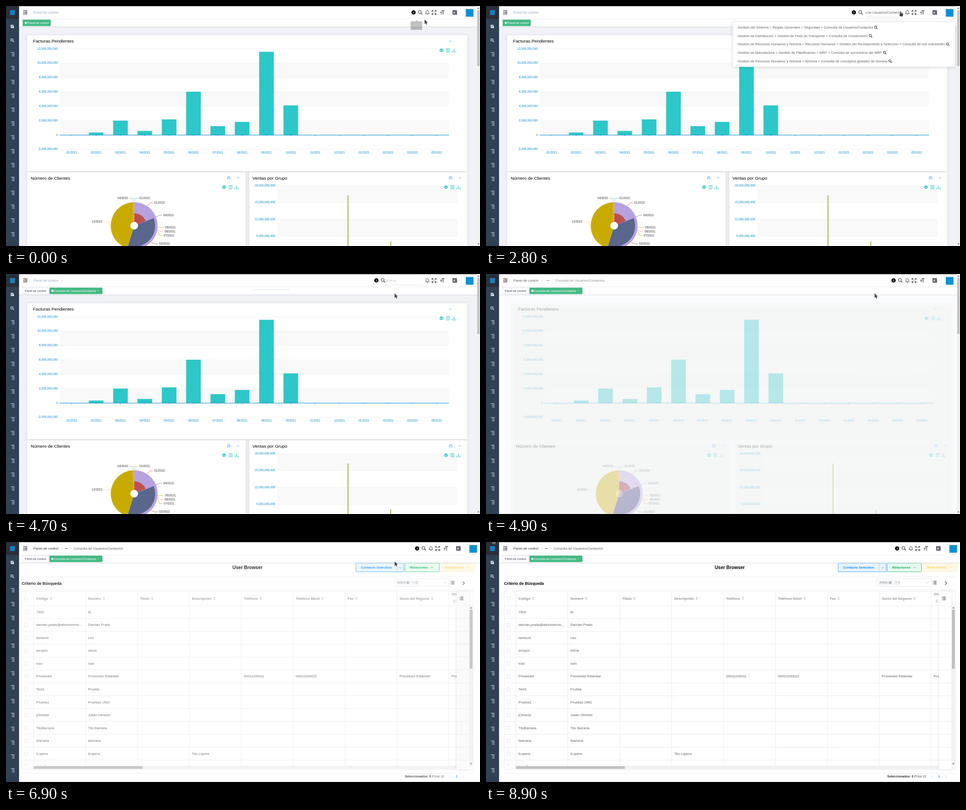
Animation, 1052 px wide and 532 px high, one loop 9000 ms. Source, as an HTML page with a canvas:

```html
<!DOCTYPE html>
<html lang="es">
<head>
<meta charset="utf-8">
<title>Panel de control</title>
<style>
html, body { margin: 0; width: 100%; height: 100%; overflow: hidden; background: #fff; }
canvas { display: block; width: 1052px; height: 532px; }
</style>
</head>
<body>
<canvas id="stage" width="1052" height="532"></canvas>
<script>
const c = document.getElementById('stage').getContext('2d');
const LOOP = 9000, PX = 0.548;
const BLUE = '#008acd', TEAL = '#2ec7c9', INK = '#303133', GREY = '#606266', PALE = '#c0c4cc';

// ---- helpers ----
const clamp = v => Math.max(0, Math.min(1, v));
const lerp = (a, b, p) => a + (b - a) * p;

function bezier(x1, y1, x2, y2) {
  const at = (a, b, u) => 3 * (1 - u) * (1 - u) * u * a + 3 * (1 - u) * u * u * b + u * u * u;
  return x => {
    if (x <= 0 || x >= 1) return clamp(x);
    let lo = 0, hi = 1;
    for (let i = 0; i < 24; i++) {
      const mid = (lo + hi) / 2;
      if (at(x1, x2, mid) < x) lo = mid; else hi = mid;
    }
    return at(y1, y2, lo);
  };
}
const ease = bezier(.25, .1, .25, 1);
const zoom = bezier(.23, 1, .32, 1);

function rect(x, y, w, h, fill) { c.fillStyle = fill; c.fillRect(x, y, w, h); }

function box(x, y, w, h, r, fill, stroke) {
  c.beginPath();
  c.roundRect(x, y, w, h, r);
  if (fill) { c.fillStyle = fill; c.fill(); }
  if (stroke) { c.strokeStyle = stroke; c.lineWidth = .8; c.stroke(); }
}

function line(color, width, ...p) {
  c.beginPath();
  for (let i = 0; i < p.length; i += 2) c.lineTo(p[i], p[i + 1]);
  c.strokeStyle = color;
  c.lineWidth = width;
  c.stroke();
}

function shape(fill, ...p) {
  c.beginPath();
  for (let i = 0; i < p.length; i += 2) c.lineTo(p[i], p[i + 1]);
  c.closePath();
  c.fillStyle = fill;
  c.fill();
}

function disc(x, y, r, fill) {
  c.beginPath();
  c.arc(x, y, r, 0, 7);
  c.fillStyle = fill;
  c.fill();
}

// size is in page pixels before the stage scale
function text(s, x, y, size, color, align = 'left', style = '') {
  c.font = `${style} ${size * PX}px "Liberation Sans", Arial, sans-serif`;
  c.textAlign = align;
  c.textBaseline = 'middle';
  c.fillStyle = color;
  c.fillText(s, x, y);
  return c.measureText(s).width;
}

function group(draw, { x = 0, alpha = 1, clip } = {}) {
  c.save();
  if (clip) { c.beginPath(); c.rect(...clip); c.clip(); }
  c.translate(x, 0);
  c.globalAlpha *= alpha;
  draw();
  c.restore();
}

// ---- icons ----
function chevron(x, y, r, angle, color, w = .9) {
  c.save();
  c.translate(x, y);
  c.rotate(angle);
  line(color, w, -r, r / 2, 0, -r / 2, r, r / 2);
  c.restore();
}
const UP = 0, RIGHT = Math.PI / 2, DOWN = Math.PI, LEFT = -Math.PI / 2;

function magnifier(x, y, r, color, w = 1.2) {
  c.beginPath();
  c.arc(x - r * .25, y - r * .25, r * .75, 0, 7);
  c.strokeStyle = color;
  c.lineWidth = w;
  c.stroke();
  line(color, w * 1.2, x + r * .3, y + r * .3, x + r * 1.1, y + r * 1.1);
}

function listIcon(x, y, color) {
  for (let i = -1; i < 2; i++) {
    rect(x - 4, y + i * 3 - .5, 1.2, 1.1, color);
    rect(x - 2, y + i * 3 - .5, 6, 1.1, color);
  }
}

function treeIcon(x, y) {
  const ink = '#dfe6ee';
  rect(x - 4, y - 4.4, 1.2, 1.1, ink);
  rect(x - 2, y - 4.4, 6, 1.1, ink);
  for (let i = 0; i < 3; i++) {
    rect(x - 1.5, y - 1.7 + i * 2.6, 1, 1, ink);
    rect(x + .3, y - 1.7 + i * 2.6, 3.9, 1, ink);
  }
}

function pageIcon(x, y, color) {
  rect(x - 3.5, y - 3.5, 6, 7, color);
  rect(x - 2, y - 1.6, 3, .8, '#304156');
  rect(x - 2, y + .2, 3, .8, '#304156');
  disc(x + 2.2, y + 1.7, 2, color);
}

function toolbox(x, y) {
  shape(TEAL, x - 4.5, y - 1.8, x, y - 4, x + 4.5, y - 1.8, x, y + .5);
  shape(TEAL, x - 4.5, y - .4, x, y + 1.8, x + 4.5, y - .4, x + 4.5, y + 1.8, x, y + 4, x - 4.5, y + 1.8);
  c.strokeStyle = TEAL;
  c.lineWidth = .9;
  c.strokeRect(x + 11.2, y - 3.8, 6.2, 7.8);
  for (let i = -1; i < 2; i++) line(TEAL, .7, x + 12.6, y + i * 1.9, x + 16, y + i * 1.9);
  line(TEAL, .9, x + 27.8, y - 4, x + 27.8, y + 2);
  line(TEAL, .9, x + 25.3, y - .4, x + 27.8, y + 2.2, x + 30.3, y - .4);
  line(TEAL, .9, x + 23.6, y + 1.5, x + 23.6, y + 4, x + 32, y + 4, x + 32, y + 1.5);
}

function printer(x, y) {
  c.strokeStyle = '#409eff';
  c.lineWidth = .8;
  c.strokeRect(x - 3, y - 1, 6, 3.6);
  line('#409eff', .8, x - 1.8, y - 1, x - 1.8, y - 2.8, x + 1.8, y - 2.8, x + 1.8, y - 1);
}

function sortIcon(x, y) {
  shape(PALE, x - 2.6, y - .8, x, y - 3.4, x + 2.6, y - .8);
  shape(PALE, x - 2.6, y + .8, x, y + 3.4, x + 2.6, y + .8);
}

function scrollbar(x, w, top, bottom, from, to) {
  rect(x, top, w, bottom - top, '#f1f1f1');
  rect(x + 1, from, w - 2, to - from, '#c1c1c1');
  const m = x + w / 2;
  shape('#505050', m - 2, top + 6, m, top + 3.6, m + 2, top + 6);
  shape('#505050', m - 2, bottom - 5.5, m, bottom - 3, m + 2, bottom - 5.5);
}

// ---- dashboard ----
function card(x, y, w, h) {
  c.save();
  c.shadowColor = 'rgba(0,0,0,.12)';
  c.shadowBlur = 6;
  c.shadowOffsetY = 1;
  rect(x, y, w, h, '#fff');
  c.restore();
}

function invoices() {
  card(47, 65, 977, 301.5);
  text('Facturas Pendientes', 60, 78.5, 18, '#000');
  chevron(986, 78, 2.8, UP, '#409eff');
  const step = 31.85;
  for (let i = 0; i < 8; i++) {
    const y = 95 + i * step, n = 12 - 2 * i;
    if (i % 2 && i < 7) rect(119, y, 864, step, '#f9f9f9');
    line('#eee', .7, 119, y, 983, y);
    text(n ? n + ',000,000,000' : '0', 115, y - .3, 12, BLUE, 'right');
  }
  const tops = [286, 280.5, 254, 277, 251.3, 190, 266.3, 257, 101.5, 220.3];
  for (let i = 0; i < 16; i++) {
    const x = 146 + 54 * i, m = i < 15 ? i % 12 + 1 : 5;
    if (i < tops.length) rect(x - 16.2, tops[i], 32.5, 286 - tops[i], TEAL);
    line(BLUE, .7, x, 286, x, 289);
    text(String(m).padStart(2, '0') + (i < 12 ? '/2021' : '/2022'), x, 325.3, 12, BLUE, 'center');
  }
  line(BLUE, 1, 119, 286.2, 983, 286.2);
  toolbox(966.5, 98);
}

function slice(r, from, to, fill) {
  const a = d => (d - 90) * Math.PI / 180;
  c.beginPath();
  c.moveTo(284.5, 487);
  c.arc(284.5, 487, r, a(from), a(to));
  c.fillStyle = fill;
  c.fill();
}

function clients() {
  card(47, 368.5, 485, 180);
  text('Número de Clientes', 55, 382.5, 18, '#000');
  printer(494.5, 381);
  chevron(514.5, 381, 2.8, UP, '#409eff');
  toolbox(484, 401.5);
  slice(52, 0, 197, '#b6a2de');
  slice(46.5, 69, 197, '#59678c');
  slice(27.5, 0, 67, '#c05050');
  slice(52, 197, 356, '#c9ab00');
  slice(52, 356, 360, '#f5994e');
  disc(284.5, 487, 8.5, '#fff');
  // label, text x, side, colour, leader start, bend
  const labels = [
    ['04/2022', 271, -1, '#97b552', 282, 435, 282, 426.5],
    ['01/2021', 296, 1, '#5ab1ef', 286, 435, 286, 426.5],
    ['01/2022', 329, 1, '#c05050', 314, 444, 319, 436.5],
    ['04/2021', 349, 1, '#59678c', 333, 467.5, 340, 464],
    ['05/2021', 353, 1, '#c9ab00', 337, 490.5, 343, 491.5],
    ['06/2021', 352, 1, '#f5994e', 336, 493, 342, 500],
    ['07/2021', 350, 1, '#7eb00a', 336, 496, 341, 509],
    ['02/2022', 340, 1, '#6f5553', 322, 524, 330, 527.5],
    ['12/2021', 214, -1, '#ffb980', 233, 479, 224, 478]
  ];
  for (const [s, x, side, color, x0, y0, x1, y1] of labels) {
    line(color, .7, x0, y0, x1, y1, x - side * 3, y1);
    text(s, x, y1, 12, '#333', side > 0 ? 'left' : 'right');
  }
}

function sales() {
  card(540, 368.5, 484, 180);
  text('Ventas por Grupo', 547, 382.5, 18, '#000');
  printer(987, 381);
  chevron(1007, 381, 2.8, UP, '#409eff');
  for (let i = 0; i < 4; i++) {
    const y = 398.3 + i * 37.3;
    if (i % 2 === 0) rect(602, y, 400, 37.3, '#f9f9f9');
    line('#eee', .7, 602, y, 1002, y);
    text(18 - 3 * i + ',000,000,000', 597.5, y, 12, BLUE, 'right');
  }
  rect(758, 420, 2, 112, '#97b552');
  rect(852.8, 522, 2, 10, '#97b552');
  toolbox(976.5, 401.5);
}

function dashboard() {
  rect(29, 46, 1023, 486, '#f0f2f5');
  invoices();
  clients();
  sales();
}

// ---- browser ----
const HEADS = ['Código', 'Nombre', 'Título', 'Descripción', 'Teléfono', 'Teléfono Móvil', 'Fax', 'Socio del Negocio'];
const ROWS = [
  ['7900', 'tb'],
  ['damian.prado@altorioservic...', 'Damian Prado'],
  ['tamboril', 'Leo'],
  ['arroyos', 'elena'],
  ['ivan', 'ivan'],
  ['Proveedor', 'Proveedor Estándar', '', '', '00011100011', '00022200022', '', 'Proveedor Estándar', 'Pro'],
  ['Test1', 'Prueba'],
  ['Prueba1', 'Pruebas UNO'],
  ['jOlmedo', 'Julian Olmedo'],
  ['TitoBarrana', 'Tito Barrana'],
  ['tbarrana', 'tbarrana'],
  ['tLopera', 'tLopera', '', 'Tito Lopera'],
  ['inesalba', '']
];
const colX = i => 66.5 + 115.2 * i;

function button(x, w, label, fill, edge, ink) {
  box(x, 46.7, w, 19.3, 1.5, fill, edge);
  text(label, x + 11, 56.8, 14, ink, 'left', 'bold');
}

function checkbox(y) { box(46.2, y - 3.8, 7.6, 7.6, 1, '#fff', '#dcdfe6'); }

function grid() {
  const edge = '#e2e6ee';
  for (let i = 0; i < 9; i++) line(edge, .8, colX(i), 109, colX(i), 496);
  checkbox(125);
  HEADS.forEach((s, i) => {
    const w = text(s, colX(i) + 5.6, 125.5, 14, '#909399', 'left', 'bold');
    sortIcon(colX(i) + 5.6 + w + 6, 125);
  });
  text('Gru', 994, 116, 14, '#909399', 'left', 'bold');
  sortIcon(1000, 131);
  ROWS.forEach((row, k) => {
    const y = 155.4 + 28.53 * k;
    line(edge, .8, 40, y - 14.3, 1005, y - 14.3);
    checkbox(y);
    row.forEach((s, i) => text(s, colX(i) + 5.6, y + .3, 14, GREY));
  });
}

function pinned() {
  c.save();
  c.shadowColor = 'rgba(0,0,0,.14)';
  c.shadowBlur = 6;
  rect(1005.5, 109.5, 27.5, 394.5, '#fff');
  c.restore();
  for (let k = 0; k < 13; k++) {
    const y = 141.1 + 28.53 * k;
    line('#e2e6ee', .8, 1005.5, y, 1033, y);
  }
  listIcon(1016, 125, INK);
}

function browser() {
  text('User Browser', 541, 57.5, 18.72, '#000', 'center', 'bold');
  button(781.5, 106.5, 'Contacts Selection', '#e8f4ff', '#1890ff', '#1890ff');
  line('#9dd0ff', .7, 873, 48, 873, 65);
  chevron(880.3, 57, 2.3, DOWN, '#1890ff');
  button(890.5, 76, 'Relaciones', '#e7faf0', '#13b95c', '#17b35d');
  chevron(951, 56.5, 2.6, DOWN, '#17b35d');
  button(968, 78.5, 'Referencias', '#fff8e6', '#fff1cc', '#ffd666');
  chevron(1032, 56.5, 2.6, DOWN, '#ffd666');
  line('#e4e7ed', .8, 40, 77, 1042, 77);
  line('#e4e7ed', .8, 40, 106.3, 1042, 106.3);
  text('Criterio de Búsqueda', 40, 92.5, 16, '#000', 'left', 'bold');
  box(867.4, 81.3, 121.5, 17, 2, '#fff', '#dcdfe6');
  box(870.5, 84.5, 32.5, 11, 1.5, '#f2f3f5');
  text('Activo', 873.5, 90.2, 12, '#909399');
  disc(897, 90, 3, '#b4b8bf');
  box(905, 84.5, 16, 11, 1.5, '#f2f3f5');
  text('+ 1', 908.5, 90.2, 12, '#909399');
  chevron(980, 90, 2.6, DOWN, PALE);
  listIcon(996, 90, INK);
  chevron(1020.7, 91.3, 3.6, RIGHT, INK, 1.1);

  c.strokeStyle = '#e2e6ee';
  c.lineWidth = .8;
  c.strokeRect(40.2, 109.3, 1001.5, 394.7);
  group(grid, { clip: [40, 109, 965.5, 387] });
  rect(66.5, 496, 939, 7.5, '#f1f1f1');
  rect(66.5, 496.8, 241.5, 6, '#c1c1c1');
  pinned();
  scrollbar(1033, 8.5, 141, 496, 150, 281);

  line('#e4e7ed', .8, 40, 513, 1042, 513);
  const w = text('Seleccionados: 0 /', 890.5, 520, 13, INK, 'left', 'bold');
  text('Total 32', 890.5 + w, 520, 13, GREY);
  chevron(989.5, 519.8, 2.4, LEFT, PALE);
  text('1', 1005.5, 520, 13, '#1890ff', 'center', 'bold');
  chevron(1021, 519.8, 2.4, RIGHT, PALE);
}

// ---- frame around the page ----
function sidebar() {
  rect(0, 0, 29, 532, '#304156');
  rect(0, 0, 29, 28.5, '#2b2f3a');
  rect(8.7, 9, 11, 11, '#0f7fbf');
  pageIcon(14, 45.3, '#dfe6ee');
  magnifier(14, 76, 3.4, '#dfe6ee', 1.1);
  for (let i = 0; i < 14; i++) treeIcon(14.5, 107 + 30.7 * i);
}

function tabs(t) {
  const y = 37.8, second = 'Consulta de Usuarios/Contactos';
  if (t < 4600) {
    rect(37, 30.2, 62.3, 14.3, '#42b983');
    disc(44, 37.4, 2.3, '#fff');
    text('Panel de control', 47.5, y, 12, '#fff');
    return;
  }
  c.strokeStyle = '#d8dce5';
  c.lineWidth = .8;
  c.strokeRect(37.4, 30.5, 56.4, 13.7);
  text('Panel de control', 41.5, y, 12, '#495060');
  rect(96.3, 30.2, 117.7, 14.3, '#42b983');
  disc(103, 37.4, 2.3, '#fff');
  text(second, 106, y, 12, '#fff');
  text('×', 205, y, 10, '#d5f0e3', 'center');
}

function breadcrumb(t) {
  const p = ease((t - 4700) / 500), name = 'Panel de control', y = 14.7;
  group(() => text(name, 61, y, 14, '#97a8be'), { alpha: 1 - p });
  group(() => text(name, 61, y, 14, INK), { alpha: p });
  if (t >= 4600) text('/', 124.5, y, 14, '#a5aab5', 'center');
  group(() => {
    for (let i = -1; i < 2; i++) disc(134.2 + i * 2.4, 14.3, .9, INK);
    text('/', 144, y, 14, '#a5aab5', 'center');
    text('Consulta de Usuarios/Contactos', 150, y, 14, GREY);
  }, { x: 11 * (1 - p), alpha: p });
}

function searchBox(t) {
  let width = 0, margin = 0;
  if (t >= 1200 && t < 4700) { width = 82.5 * ease((t - 1200) / 200); margin = 5.5; }
  else if (t >= 4700) width = 82.5 * (1 - ease((t - 4700) / 200));
  const x = 904.5 - width - margin;
  disc(x, 14.3, 4.7, '#000');
  text('i', x, 14.6, 14, '#fff', 'center', 'italic bold');
  magnifier(x + 15, 14.2, 4.2, '#444');
  if (width < 1) return;
  const left = 925 - width;
  line('#d9dce2', .8, left, 24.3, 925, 24.3);
  group(() => {
    const filled = t >= 2300 && t < 4600;
    if (filled) text('Consulta de Usuarios/Contactos', 924.5, 15, 14, GREY, 'right');
    else text('Buscar', left, 15, 14, PALE);
    if (t < 1800) rect(left, 10, .8, 9, '#333');
    if (t >= 2300 && t < 2800 || t >= 3500 && t < 4100) rect(924, 10, .8, 9, '#333');
  }, { clip: [left - .5, 5, width + 1, 22] });
}

function navbar(t) {
  rect(29, 0, 1023, 46, '#fff');
  line('#e6e8ec', .8, 29, 28.5, 1052, 28.5);
  rect(29, 45.8, 1023, .8, '#d3d8e2');
  rect(29, 46.6, 1023, .8, 'rgba(0,0,0,.05)');
  for (const [y, x] of [[10.5, 38], [13, 42], [15.3, 42], [17.8, 38]]) line('#333', 1.2, x, y, 47.3, y);
  shape('#333', 38, 14.2, 40.6, 12.4, 40.6, 16);
  breadcrumb(t);
  tabs(t);
  group(() => {
    searchBox(t);
    const ink = '#444';
    // bell
    line(ink, 1, 930.6, 17, 932, 15.5, 932, 12.8, 933.2, 10.8, 935, 10, 936.8, 10.8, 938, 12.8, 938, 15.5, 939.4, 17, 930.6, 17);
    rect(933.8, 18, 2.4, 1, ink);
    // full screen
    for (const sx of [-1, 1]) for (const sy of [-1, 1]) {
      const px = 950 + sx * 4.6, py = 14.3 + sy * 4.6;
      line(ink, 1.1, px - sx * 3, py, px, py, px, py - sy * 3);
      line(ink, 1.1, px, py, px - sx * 3.4, py - sy * 3.4);
    }
    // font size
    line(ink, 1.3, 966.5, 10.2, 973.5, 10.2);
    line(ink, 1.3, 970, 10.2, 970, 19);
    line(ink, 1.2, 963.6, 13.6, 968, 13.6);
    line(ink, 1.2, 965.8, 13.6, 965.8, 18.6);
    // language
    box(991, 9.3, 10, 10, 1, '#5a5e66');
    text('A', 994.8, 14.8, 12, '#fff', 'center', 'bold');
    text('x', 998.8, 12, 7, '#fff', 'center');
    rect(1020.5, 6.7, 17, 17, '#0d8fd6');
  }, { x: t >= 6600 ? 8 : 0 });
  rect(0, 0, 1052, 1, '#8c8c8c');
}

// ---- suggestions ----
const DA = 'Análisis de Desempeño > Reglas Contables > ', RH = 'Gestión de Recursos Humanos y Nómina > ';
const FIRST = [
  'Documentación',
  'Gestión de Ventas > Facturas de Ventas > Documentos por Cobrar',
  'Gestión de Compras > Documentos por Pagar',
  DA + 'Documentos sin Aplicar',
  DA + 'Contra Documentos',
  'Gestión del Sistema > Datos > Servicio > Mis Documentos sin Procesar',
  DA + 'Tipo de Documento',
  'Gestión del Sistema > Datos > Importar Datos > Importar Documentos CxC/CxP'
];
const SECOND = [
  'Gestión del Sistema > Reglas Generales > Seguridad > Consulta de Usuarios/Contactos',
  'Gestión de Distribución > Gestión de Flota de Transporte > Consulta de Conductores',
  RH + 'Recursos Humanos > Gestión del Reclutamiento y Selección > Consulta de mis solicitantes',
  'Gestión de Manufactura > Gestión de Planificación > MRP > Consulta de suministros del MRP',
  RH + 'Nómina > Consulta de conceptos globales de Nómina'
];

function menu(items, x, h, hover) {
  c.save();
  c.shadowColor = 'rgba(0,0,0,.16)';
  c.shadowBlur = 7;
  c.shadowOffsetY = 1;
  box(x, 0, 1041 - x, h, 2, '#fff');
  c.restore();
  box(x, 0, 1041 - x, h, 2, null, '#e4e7ed');
  c.beginPath();
  c.rect(x, 0, 1041 - x, h);
  c.clip();
  if (hover) rect(x + .5, 3.5, 1040 - x, 18.6, '#f5f7fa');
  items.forEach((s, i) => {
    const y = 12.8 + 18.66 * i, w = text(s, x + 11, y, 14, GREY), ix = x + w + 17;
    if (items === SECOND) return magnifier(ix, y - .2, 3.2, '#444', 1.1);
    rect(ix - 3.5, y - 3.6, 7.4, 7.2, '#4a4a4a');
    if (i) { rect(ix - 2, y - 3.6, 1, 1.6, '#ddd'); rect(ix + 1, y - 3.6, 1, 1.6, '#ddd'); }
    else { rect(ix - 2, y - 1.5, 3, .8, '#fff'); rect(ix - 2, y + .8, 4, .8, '#fff'); }
  });
}

function suggestions(t) {
  if (t < 1200 || t >= 4800) return;
  if (t >= 4600) return rect(547.5, 34.6, 82.5, .9, '#cfdcee');
  const p = zoom((t - 1200) / 300);
  if (p <= 0) return;
  c.save();
  c.translate(0, 35);
  c.scale(1, p);
  c.globalAlpha = p;
  if (t < 2800) menu(FIRST, 595.7, 142.5);
  else menu(SECOND, 547.7, 99.8, t >= 4000);
  c.restore();
}

function tooltip() {
  group(() => {
    shape(INK, 908, 34, 911, 31.5, 914, 34);
    box(898, 34, 25.7, 19, 2, INK);
    text('Guía', 911, 44, 12, '#fff', 'center');
  }, { alpha: .3 });
}

// ---- pointer ----
function outlined(...p) {
  c.lineJoin = 'round';
  line('rgba(255,255,255,.8)', 1.4, ...p, p[0], p[1]);
  shape('#424242', ...p);
  c.lineJoin = 'miter';
}

function arrow(x, y) {
  outlined(x, y, x, y + 10, x + 2.3, y + 8, x + 3.9, y + 11.5, x + 5.7, y + 10.7, x + 4.2, y + 7.3, x + 7, y + 7);
}

function hand(x, y) {
  outlined(x - 2, y, x - .5, y, x, y + 3.6, x + 4, y + 4.4, x + 5, y + 5.6, x + 4.3, y + 9, x + 3.5, y + 11,
    x - 1.2, y + 11, x - 4.3, y + 7, x - 3.7, y + 6.2, x - 2, y + 7.2);
}

function pointer(t) {
  if (t < 4300) {
    const a = clamp((t - 100) / 700), b = clamp((t - 3700) / 400);
    const x = lerp(lerp(929, 921, a), 863, b), y = lerp(lerp(30, 12, a), 43, b);
    return (t < 700 ? arrow : hand)(x, y);
  }
  if (t < 7600) arrow(862.5, 43);
  else if (t < 8100) arrow(662, 140);
  else if (t < 8600) arrow(80, 147);
  else if (t < 8900) arrow(122, 26);
  else arrow(14.5, -7.5);
}

// ---- scene ----
function render(t) {
  rect(0, 0, 1052, 532, '#fff');
  const page = [29, 46, 1023, 486];
  if (t >= 4600) line('#d9d9d9', .8, 29, 530.5, 1052, 530.5);
  if (t < 5200) {
    const p = ease((t - 4700) / 500);
    group(dashboard, { x: 16.4 * p, alpha: 1 - p, clip: page });
  }
  if (t >= 6600) {
    const p = ease((t - 6635) / 500);
    group(browser, { x: -30 * (1 - p), alpha: p, clip: page });
  }
  navbar(t);
  sidebar();
  suggestions(t);
  if (t < 6600) scrollbar(1045, 7, 0, 532, 9, 133);
  if (t < 200) tooltip();
  pointer(t);
}

const start = performance.now();
function tick() {
  const t = (performance.now() - start) % LOOP;
  render(Math.floor(t / 100) * 100);
  requestAnimationFrame(tick);
}
tick();
</script>
</body>
</html>
```
